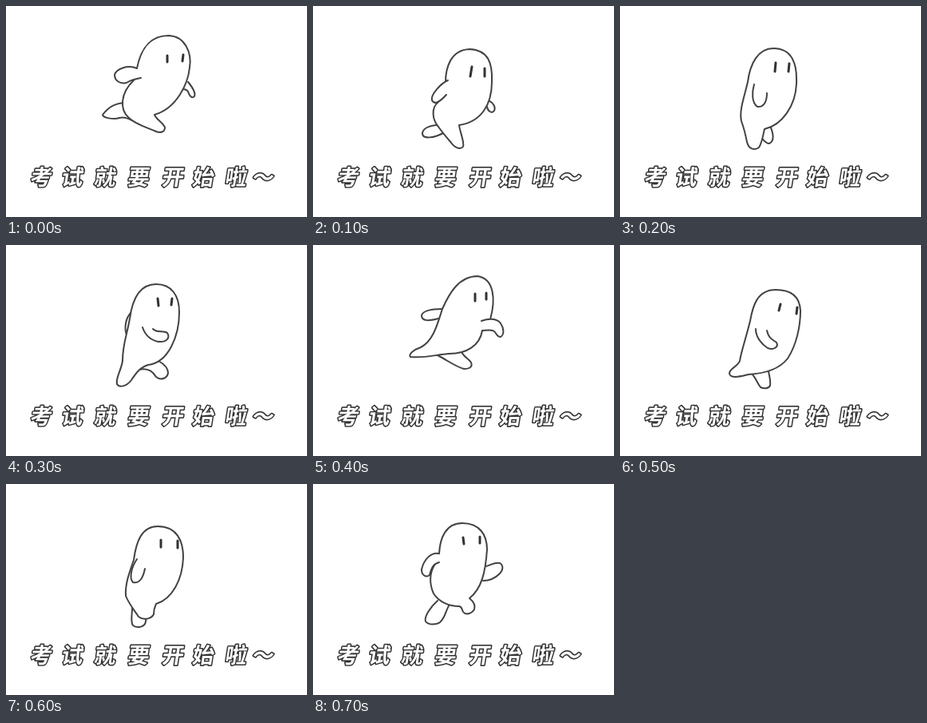
Write an HTML page that moves like this. It is 377 px wide and 264 px high and loops after 800 ms.

```html
<!DOCTYPE html>
<html lang="zh">
<head>
<meta charset="utf-8">
<title>考试就要开始啦</title>
<style>
  html, body { margin: 0; width: 100%; height: 100%; overflow: hidden; background: #fff; }
  svg { display: block; width: 100%; height: 100%; }
  .pose {
    fill: #fff; stroke: #424242; stroke-width: 2;
    stroke-linecap: round; stroke-linejoin: round;
    visibility: hidden;
    animation: show .8s step-end calc(var(--i) * .1s - .8s) infinite;
  }
  .eyes { stroke-width: 3; stroke: #333; }
  .line { fill: none; }
  .caption {
    font: 900 27px "Noto Sans CJK SC", "Noto Sans CJK", sans-serif;
    text-anchor: middle;
    fill: #fff; stroke: #333; stroke-width: 3; stroke-linejoin: round;
    paint-order: stroke;
  }
  @keyframes show {
    0% { visibility: visible; }
    12.5%, 100% { visibility: hidden; }
  }
</style>
</head>
<body>
<svg viewBox="0 0 377 264">
  <!-- each pose: far limbs, body with near leg, near arm, eyes -->
  <g class="pose" style="--i:0">
    <path d="M149 121C136 122 129 126 121 136C122 141 137 142 142 140C148 138 154 141 158 143"/>
    <path d="M228 95C233 101 238 108 236 113C233 117 229 111 228 107C226 104 224 104 221 104"/>
    <path d="M164 78C168 58 177 37 204 37C224 38 233 58 230 77C228 97 214 128 186 136C187 141 198 147 199 152C199 158 193 159 188 157C174 151 162 148 154 140C142 130 143 109 160 93"/>
    <path d="M164 78C152 73 138 79 136 86C136 94 144 98 151 96C158 92 162 91 169 90"/>
    <path class="eyes" d="M202 62V70M222 61L221 69"/>
  </g>
  <g class="pose" style="--i:1">
    <path d="M155 149C144 150 137 154 137 160C138 167 152 165 163 159"/>
    <path d="M221 119C226 121 229 127 227 131C224 135 219 132 218 126"/>
    <path d="M166 96C166 76 173 55 196 54C220 55 225 72 224 95C224 123 211 145 183 149C184 158 190 170 188 176C185 180 178 178 173 171C167 164 161 157 157 151C150 143 147 128 157 120"/>
    <path d="M169 93C160 97 147 111 149 118C152 124 159 120 167 111"/>
    <path class="eyes" d="M199 76L197 88M215 78V88"/>
  </g>
  <g class="pose" style="--i:2">
    <path d="M172 160C178 163 180 172 187 172C194 169 192 159 188 150"/>
    <path d="M192 53C173 53 163 72 160 95C156 113 149 130 152 144C155 152 157 160 159 170C161 179 168 181 174 177C178 171 179 162 181 154C203 149 220 125 221 97C222 73 216 53 192 53Z"/>
    <path class="line" d="M168 98C165 108 165 121 172 126C180 127 184 120 184 109"/>
    <path class="eyes" d="M195 71L194 82M212 72L211 82"/>
  </g>
  <g class="pose" style="--i:3">
    <path d="M157 84C150 91 147 104 152 115"/>
    <path d="M166 156C178 153 184 158 188 165C194 170 202 167 203 160C203 154 198 149 191 145"/>
    <path d="M188 49C166 49 158 70 155 92C151 115 146 124 146 145C144 158 137 166 139 174C142 179 151 177 157 169C163 160 168 153 178 150C204 147 217 113 217 84C217 64 208 49 188 49Z"/>
    <path class="line" d="M171 103C174 112 181 119 191 121C201 122 206 116 202 110C197 106 190 111 184 105"/>
    <path class="eyes" d="M190 67L191 76M208 67L207 75"/>
  </g>
  <g class="pose" style="--i:4">
    <path d="M162 80C150 80 138 82 136 88C136 96 146 95 157 92"/>
    <path d="M156 138C168 144 178 152 189 155C197 155 200 152 198 147C195 142 187 139 186 133"/>
    <path d="M222 93C229 68 227 42 206 39C182 39 170 62 162 80C156 98 151 120 135 128C126 131 119 137 122 140C138 142 155 137 171 136C192 136 209 126 212 107"/>
    <path d="M211 95C219 92 230 91 235 98C239 104 240 112 235 115C229 115 230 108 225 107C220 106 216 107 212 107"/>
    <path class="eyes" d="M203 61V70M217 60V68"/>
  </g>
  <g class="pose" style="--i:5">
    <path d="M165 161C170 166 172 173 176 178C180 180 186 180 188 176C189 170 187 164 186 158"/>
    <path d="M195 56C171 56 166 78 163 95C158 116 152 132 150 145C148 152 137 154 137 161C139 168 152 164 161 162C178 161 199 156 210 142C221 125 226 102 226 82C225 64 214 56 195 56Z"/>
    <path class="line" d="M170 105C170 115 177 124 185 129C193 132 199 127 196 122C191 118 186 117 184 107"/>
    <path class="eyes" d="M201 74L199 82M222 78L221 86"/>
  </g>
  <g class="pose" style="--i:6">
    <path d="M158 150C159 160 155 172 159 177C165 181 174 179 175 172C176 165 176 160 178 152"/>
    <path d="M190 53C170 53 163 72 160 95C154 112 149 126 150 140C154 150 160 157 166 166C172 171 182 169 185 163C185 158 186 154 188 150C208 144 221 120 222 92C222 71 214 53 190 53Z"/>
    <path class="line" d="M164 94C157 104 154 118 159 123C168 125 172 116 174 106"/>
    <path class="eyes" d="M194 70V79M215 71V80"/>
  </g>
  <g class="pose" style="--i:7">
    <path d="M156 146C147 154 139 166 141 172C145 177 155 176 159 173C166 167 166 158 171 151"/>
    <path d="M216 103C222 102 228 97 234 99C239 102 238 108 234 112C228 118 221 121 213 121"/>
    <path d="M158 87C159 68 166 49 187 49C209 49 218 64 218 82C216 111 211 131 196 143C201 147 204 151 202 157C198 163 191 164 188 160C186 156 187 154 183 153C171 153 158 148 151 137C146 126 145 112 153 100"/>
    <path d="M158 87C148 85 139 94 136 107C136 115 142 117 146 114C148 108 148 101 158 98"/>
    <path class="eyes" d="M188 67L189 75M209 66V74"/>
  </g>
  <text class="caption" transform="translate(0 224) skewX(-9)" x="43 82 123 165 188 208 246 287 321">考试就要 开始啦～</text>
</svg>
</body>
</html>
```
